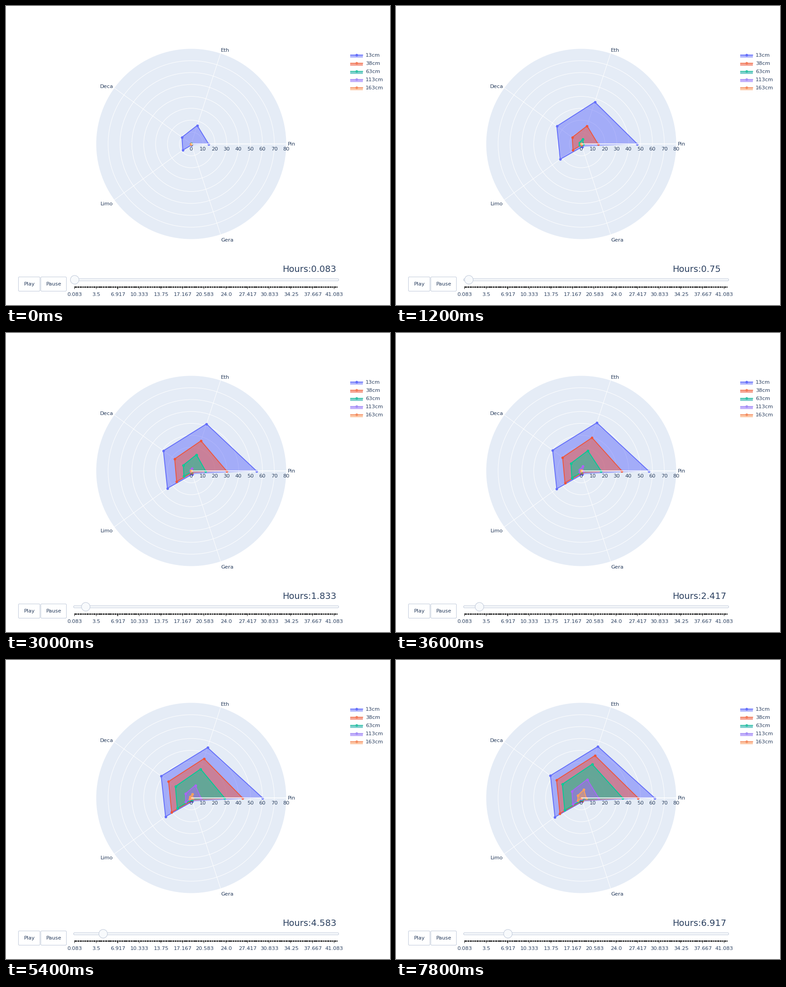
A matplotlib script that plays this animation: 849x660 px, repeating every 8000 ms.

```python
from math import erfc, floor, sqrt

import numpy as np
import matplotlib.pyplot as plt
from matplotlib.animation import FuncAnimation
from matplotlib.patches import Circle, FancyBboxPatch, Polygon, Rectangle

W, H, DPI = 849, 660, 100
SCALE = 0.95                      # the interface is drawn at 95 % zoom
CX, CY, UNIT = 409.5, 304.5, 2.625
INK, EDGE, PALE = "#2a3f5f", "#bec8d9", "#f8fafc"
SMALL, LARGE, STROKE, DOT = 11.5, 19.5, 1.9, 5.8
ANGLES = np.radians(np.arange(5) * 72)

# Five-minute step shown at each stage of the slider
STEPS = [1, 5, 9, 13, 17, 22, 29, 35, 41, 55, 61, 70, 77, 83]

# Surface level and resistance per cm for Pin, Eth, Deca, Limo, Gera
COMPOUNDS = [(69, 0.0186), (49.6, 0.0148), (35.3, 0.0165), (30, 0.0159), (3.5, 0.0165)]

# Depth in cm, trace colour, legend stroke, legend fill
SERIES = [(13, "#636efa", "#636efa", "#b1b6fc"),
          (38, "#ef553b", "#f27d5c", "#f5a595"),
          (63, "#00cc96", "#33c2a6", "#80d0cd"),
          (113, "#ab63fa", "#a58ff5", "#c4b2fb"),
          (163, "#ffa15a", "#f48e62", "#fccaaa")]


def pt(px):
    return px * 72 / DPI


plt.rcParams["font.family"] = "DejaVu Sans"
fig = plt.figure(figsize=(W / DPI, H / DPI), dpi=DPI, facecolor="white")
ax = fig.add_axes([0, 0, 1, 1])
ax.set_xlim(0, W)
ax.set_ylim(H, 0)
ax.axis("off")


def label(x, y, s, ha="left", px=SMALL):
    return ax.text(x, y, s, ha=ha, va="baseline", fontsize=pt(px), color=INK, zorder=8)


def line(xs, ys, color, px, z, **kw):
    return ax.plot(xs, ys, color=color, lw=pt(px), zorder=z, snap=False,
                   ms=pt(DOT), mew=0, **kw)[0]


def box(x0, y0, x1, y1, fill):
    ax.add_patch(FancyBboxPatch((x0, y0), x1 - x0, y1 - y0,
                                boxstyle="round,pad=0,rounding_size=2",
                                fc=fill, ec=EDGE, lw=pt(1), zorder=3))


def polar(r):
    r = np.asarray(r) * UNIT
    return CX + r * np.cos(ANGLES), CY - r * np.sin(ANGLES)


def level(surface, resistance, depth, hour):
    """Diffusion into a half space, slightly slower at the front."""
    z = resistance * depth / sqrt(hour + 0.008)
    return surface * erfc(z * (1 + 0.13 * z))


def hour_text(step):
    return str(round(step / 12, 3))


def slider_x(step):
    return 151.8 + (step - 1) * 14 / 12


def draw_polar():
    ax.add_patch(Circle((CX, CY), 80 * UNIT, fc="#e5ecf6", lw=0, zorder=0))
    for v in range(10, 80, 10):
        ax.add_patch(Circle((CX, CY), v * UNIT, fill=False, ec="white", lw=pt(1), zorder=1))
    for x, y in zip(*polar([80] * 5)):
        line([CX, x], [CY, y], "white", 1, 1)
    line([CX, CX + 80 * UNIT], [CY, CY], "white", STROKE, 7, solid_capstyle="butt")
    for v in range(0, 90, 10):
        label(CX - 0.4 + v * UNIT, 318.8, str(v), "center")
    label(622.5, 308.3, "Pin")
    label(475, 101, "Eth")
    label(237, 181, "Deca", "right")
    label(237, 439.5, "Limo", "right")
    label(475, 519.8, "Gera")


def draw_legend():
    for i, (depth, _, stroke, fill) in enumerate(SERIES):
        y = 108.3 + 18 * i
        ax.add_patch(Rectangle((761, y), 28.5, 5.4, fc=fill, lw=0, zorder=3))
        line([761, 789.5], [y, y], stroke, STROKE, 4, solid_capstyle="butt")
        line([775.3], [y], stroke, STROKE, 5, marker="o")
        label(795, y + 4, f"{depth}cm")


def draw_controls():
    box(27.5, 598, 75, 629.5, "white")
    box(77, 598, 133.5, 629.5, "white")
    label(51.5, 616.7, "Play", "center")
    label(105.5, 616.7, "Pause", "center")
    box(149.5, 602, 735.5, 606.7, PALE)
    for step in range(1, 500):
        x = SCALE * floor(slider_x(step) / SCALE)   # ticks sit on whole unzoomed pixels
        major = step % 41 == 1
        ax.add_patch(Rectangle((x - 0.5, 618.5), 1.05, 6.6 if major else 3.8,
                               fc="#333333", lw=0, zorder=3))
        if major:
            label(slider_x(step), 640.3, hour_text(step), "center")


draw_polar()
draw_legend()
draw_controls()
counter = label(611.3, 586.7, "", px=LARGE)
knob = Circle((0, 604.3), 9.5, fc=PALE, ec=EDGE, lw=pt(1), zorder=6)
ax.add_patch(knob)

areas, outlines = [], []
for i, (_, color, *_) in enumerate(SERIES):
    z = 2 + i * 0.5
    area = Polygon(np.zeros((5, 2)), fc=color, alpha=0.5, lw=0, zorder=z)
    areas.append(ax.add_patch(area))
    outlines.append(line([], [], color, STROKE, z + 0.2, marker="o"))


def update(i):
    step = STEPS[i // 3]
    for (depth, *_), area, outline in zip(SERIES, areas, outlines):
        x, y = polar([level(*c, depth, step / 12) for c in COMPOUNDS])
        area.set_xy(np.column_stack([x, y]))
        outline.set_data(x, y)
    knob.center = (slider_x(step), 604.3)
    counter.set_text("Hours:" + hour_text(step))
    return [*areas, *outlines, knob, counter]


anim = FuncAnimation(fig, update, frames=40, interval=200, repeat=True, repeat_delay=0)
plt.show()
```
